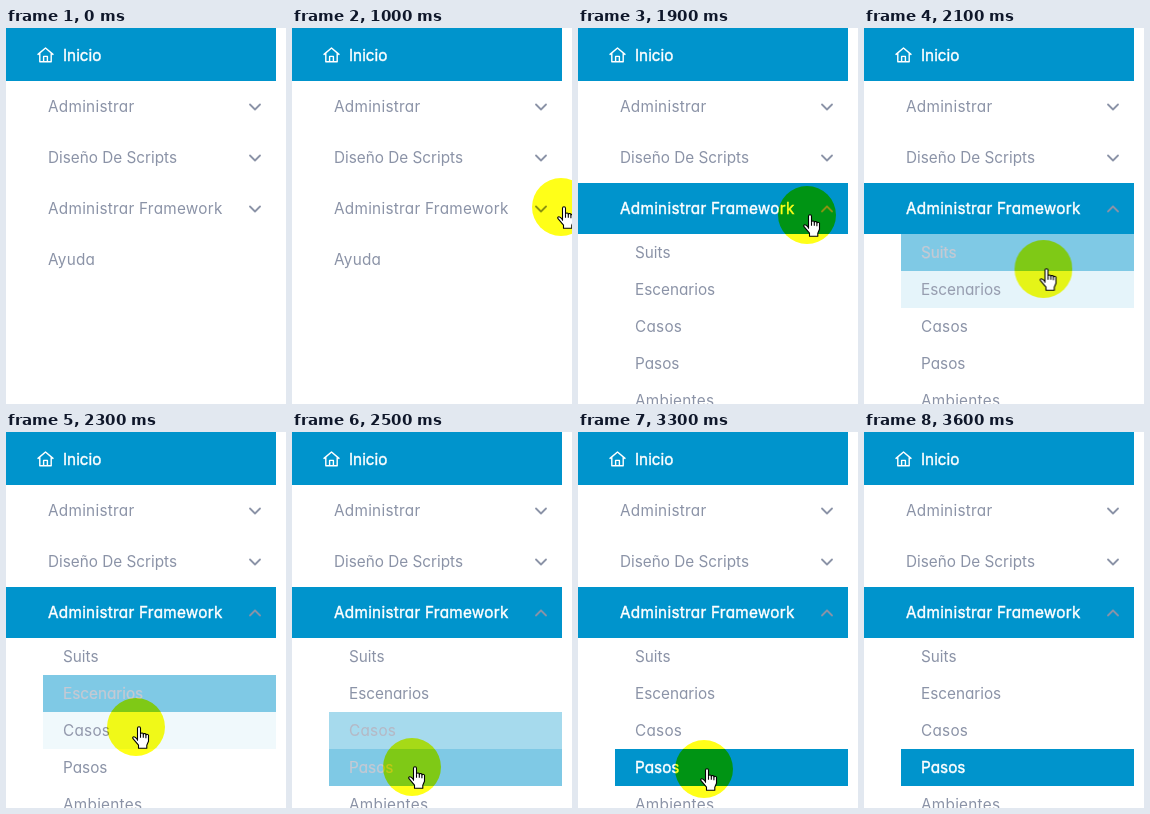
Recreate the animation shown at these times as an HTML page. Size 280 by 376 pixels, loop 4 s.

```html
<!DOCTYPE html>
<html lang="es">
<head>
<meta charset="utf-8">
<title>Menú</title>
<style>
@property --h { syntax: "<number>"; inherits: true; initial-value: 0; }

html, body { margin: 0; width: 100%; height: 100%; overflow: hidden; background: #fff; }

#stage {
  --blue: 0 148 204;
  --grey: #8b93a7;
  position: relative;
  isolation: isolate;
  width: 280px;
  height: 376px;
  overflow: hidden;
  background: #fff;
  font: 400 15.3px Inter, "Open Sans", sans-serif;
  font-feature-settings: "cv11";
  letter-spacing: .27px;
  white-space: nowrap;
}

/* --h is the strength of the highlight, 0 to 1 */
.row {
  position: relative;
  box-sizing: border-box;
  width: 270px;
  height: 51px;
  padding-left: 42px;
  line-height: 52px;
  background: rgb(var(--blue) / var(--h));
  color: color-mix(in srgb, #fff calc(var(--h) * 100%), var(--grey));
  -webkit-text-stroke: calc(var(--h) * .4px) currentColor;
}
.top { --h: 1; height: 53px; line-height: 55px; padding-left: 57px; }
.sub { overflow: hidden; height: 0; }
.sub .row { width: 233px; height: 37px; margin-left: 37px; padding-left: 20px; line-height: 38px; }
.tight { letter-spacing: 0; }

svg { position: absolute; overflow: visible; fill: none; }
.home { left: 31px; top: 19px; stroke: #fff; stroke-width: 1.4; stroke-linejoin: round; stroke-linecap: round; }
.chev { left: 243px; top: 20px; stroke: var(--grey); stroke-width: 1.8; stroke-linecap: round; stroke-linejoin: round; }
.spot, .hand { left: 0; top: 0; }
.spot { fill: #ffff18; mix-blend-mode: multiply; }
.hand { fill: #fff; stroke: #000; stroke-width: 1.1; stroke-linejoin: round; }

.main, .sub, .flip, .suits, .esc, .casos, .pasos, .spot, .hand { animation: 4s step-end infinite; }
.main { animation-name: main; }
.sub { animation-name: open; }
.flip { animation-name: flip; }
.suits { animation-name: suits; }
.esc { animation-name: esc; }
.casos { animation-name: casos; }
.pasos { animation-name: pasos; }
.spot, .hand { animation-name: move; }

@keyframes main {
  0% { --h: 0; }
  27.5% { --h: .25; }
  30% { --h: .7; }
  32.5% { --h: .97; }
  35%, 100% { --h: 1; }
}
@keyframes open {
  0% { height: 0; }
  35% { height: 90px; }
  37.5%, 100% { height: 222px; }
}
@keyframes flip {
  0% { transform: none; }
  35% { transform: rotate(90deg); }
  37.5%, 100% { transform: rotate(180deg); }
}
@keyframes suits {
  0% { --h: 0; }
  50% { --h: .2; }
  52.5% { --h: .5; }
  55% { --h: .2; }
  57.5%, 100% { --h: 0; }
}
@keyframes esc {
  0% { --h: 0; }
  52.5% { --h: .1; }
  55% { --h: .6; }
  57.5% { --h: .5; }
  60% { --h: .15; }
  62.5%, 100% { --h: 0; }
}
@keyframes casos {
  0% { --h: 0; }
  57.5% { --h: .06; }
  60% { --h: .5; }
  62.5% { --h: .35; }
  65% { --h: .1; }
  67.5%, 100% { --h: 0; }
}
@keyframes pasos {
  0% { --h: 0; }
  60% { --h: .06; }
  62.5% { --h: .5; }
  65% { --h: .9; }
  67.5%, 100% { --h: 1; }
}
@keyframes move {
  0% { visibility: hidden; transform: translate(269px, 179px); }
  25% { visibility: visible; transform: translate(269px, 179px); animation-timing-function: steps(3); }
  32.5% { transform: translate(234px, 183px); animation-timing-function: steps(2); }
  37.5% { transform: translate(229px, 187px); }
  47.5% { transform: translate(229px, 187px); animation-timing-function: steps(4); }
  57.5% { transform: translate(130px, 295px); }
  60% { transform: translate(123px, 319px); }
  62.5% { transform: translate(120px, 335px); }
  65% { transform: translate(119px, 343px); animation-timing-function: steps(3); }
  72.5% { transform: translate(121px, 331px); }
  77.5% { transform: translate(112px, 326px); }
  80% { transform: translate(110px, 328px); }
  82.5% { transform: translate(126px, 337px); }
  85% { transform: translate(166px, 353px); }
  87.5% { visibility: visible; transform: translate(220px, 374px); }
  90%, 100% { visibility: hidden; transform: translate(269px, 405px); }
}
</style>
</head>
<body>
<div id="stage">
  <div class="row top tight">
    <svg class="home" width="17" height="17"><path d="M1 7.4L8.5 1 16 7.4M2.8 6.2V14.8H14.2V6.2M6.6 14.8V9.4H10.4V14.8"/></svg>
    Inicio
  </div>
  <div class="row">Administrar
    <svg class="chev" width="12" height="12"><path d="M1 3.5L6 8.5 11 3.5"/></svg>
  </div>
  <div class="row"><span class="tight">Diseño De Scripts</span>
    <svg class="chev" width="12" height="12"><path d="M1 3.5L6 8.5 11 3.5"/></svg>
  </div>
  <div class="row main">Administrar Framework
    <svg class="chev flip" width="12" height="12"><path d="M1 3.5L6 8.5 11 3.5"/></svg>
  </div>
  <div class="sub">
    <div class="row suits tight">Suits</div>
    <div class="row esc tight">Escenarios</div>
    <div class="row casos">Casos</div>
    <div class="row pasos tight">Pasos</div>
    <div class="row">Ambientes</div>
  </div>
  <div class="row">Ayuda</div>

  <svg class="spot" width="1" height="1"><circle r="29"/></svg>
  <svg class="hand" width="1" height="1">
    <g transform="translate(-4 -.8)">
      <path d="M5.5 14V2a1.5 1.5 0 0 1 3 0V8a1.4 1.4 0 0 1 2.8 .4 1.3 1.3 0 0 1 2.6 .6 1.3 1.3 0 0 1 2.6 1V15L14.8 19V22H6.5V19L1 12.5q-.8-2 1-2 1.3 0 3.5 3Z"/>
      <path d="M8.5 8V11.5M11.3 8.4V11.5M13.9 9V12"/>
    </g>
  </svg>
</div>
</body>
</html>
```
